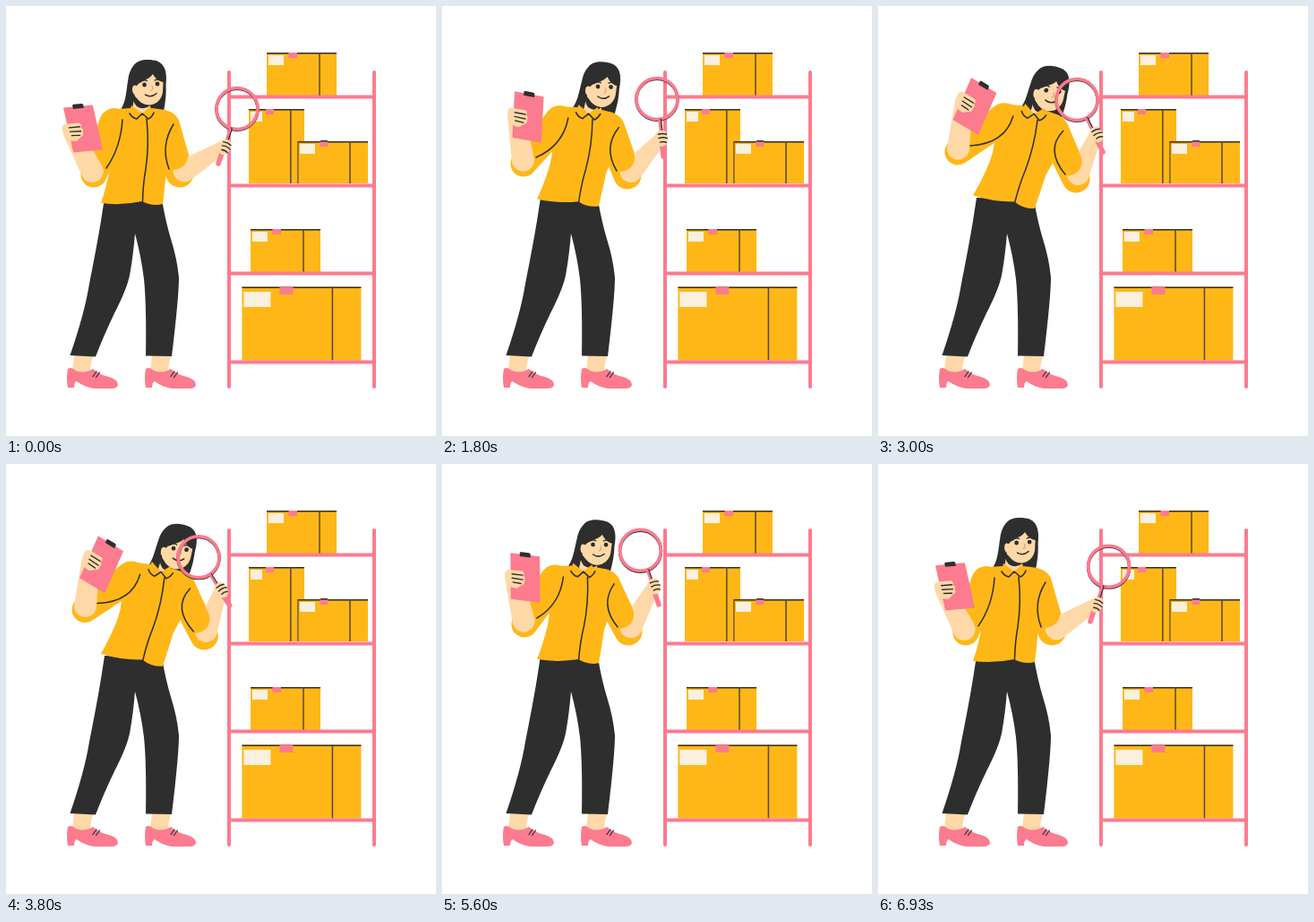
These frames come from a looping animation (480x480 px, 6990 ms). An HTML page with a canvas:

```html
<!DOCTYPE html>
<html lang="en">
<head>
<meta charset="utf-8">
<title>Stock check</title>
<style>
html, body { margin: 0; width: 100%; height: 100%; overflow: hidden; background: #fff; }
canvas { display: block; width: 100vw; height: 100vh; }
</style>
</head>
<body>
<canvas id="stage" width="480" height="480"></canvas>
<script>
const ctx = document.getElementById('stage').getContext('2d');
const YELLOW = '#ffb718', PINK = '#fc7b8f', DARK = '#2e2e2e', SKIN = '#ffd8a8', CREAM = '#faf0df', SEAM = '#5a4820';
const LOOP = 6990, STEPS = 70;

// Key poses over one loop; the values between them are smoothed.
const KEYS = [0, 8, 18, 30, 46, 56, STEPS];
const TRACKS = {
  lean:    [0, 2, 12, 23, 17, 6],
  tilt:    [0, .02, .1, .2, .15, .05],
  headX:   [0, 5, 17, 29, 24, 12],
  headY:   [0, 1, 2, 6, 5, 2],
  headR:   [0, .03, .1, .17, .15, .08],
  boardX:  [86, 89, 96, 108, 102, 93],
  boardY:  [137, 133, 124, 112, 116, 127],
  boardR:  [-.09, -.03, .18, .54, .45, .12],
  elbowLX: [98, 95, 91, 89, 88, 92],
  elbowLY: [188, 186, 176, 163, 166, 179],
  elbowRX: [194, 195, 207, 221, 218, 208],
  elbowRY: [187, 187, 189, 193, 190, 187],
  handX:   [243, 243, 244, 243, 236, 236],
  handY:   [157, 153, 148, 144, 139, 137],
  lensX:   [258, 254, 240, 222, 212, 221.5],
  lensY:   [114.5, 110.7, 103.5, 104.5, 102, 96.3],
  endX:    [237, 239, 247, 251, 247, 242],
  endY:    [176, 174, 168, 163, 154, 157]
};

function slope(v, i) {
  if (i % 6 === 0) return 0;
  return (v[(i + 1) % 6] - v[i - 1]) / (KEYS[i + 1] - KEYS[i - 1]);
}

function sample(v, n) {
  let i = 0;
  while (n >= KEYS[i + 1]) i++;
  const span = KEYS[i + 1] - KEYS[i], u = (n - KEYS[i]) / span;
  const a = v[i], b = v[(i + 1) % 6], u2 = u * u, u3 = u2 * u;
  return a * (2 * u3 - 3 * u2 + 1) + b * (3 * u2 - 2 * u3)
    + span * (slope(v, i) * (u3 - 2 * u2 + u) + slope(v, i + 1) * (u3 - u2));
}

function fill(path, color) {
  ctx.fillStyle = color;
  ctx.fill(new Path2D(path));
}

function stroke(path, color = DARK, width = 1.5) {
  ctx.strokeStyle = color;
  ctx.lineWidth = width;
  ctx.stroke(new Path2D(path));
}

function rect(x, y, w, h, color) {
  ctx.fillStyle = color;
  ctx.fillRect(x, y, w, h);
}

function circle(x, y, r, color) {
  ctx.fillStyle = color;
  ctx.beginPath();
  ctx.arc(x, y, r, 0, 7);
  ctx.fill();
}

function placed(x, y, angle, draw) {
  ctx.save();
  ctx.translate(x, y);
  ctx.rotate(angle);
  draw();
  ctx.restore();
}

// Tapered limb between two round joints.
function limb([ax, ay], ra, [bx, by], rb, color) {
  const dir = Math.atan2(by - ay, bx - ax);
  const off = Math.acos((ra - rb) / Math.hypot(bx - ax, by - ay));
  ctx.fillStyle = color;
  ctx.beginPath();
  ctx.arc(ax, ay, ra, dir + off, dir - off + 2 * Math.PI);
  ctx.arc(bx, by, rb, dir - off, dir + off);
  ctx.fill();
}

function toward([ax, ay], [bx, by], dist) {
  const k = dist / Math.hypot(bx - ax, by - ay);
  return [ax + (bx - ax) * k, ay + (by - ay) * k];
}

function carton(x, y, w, h, seam, labelW, labelH, tapeX, tapeW, drop = 3) {
  rect(x, y, w, h, YELLOW);
  rect(x, y, w, 1.5, DARK);
  rect(x + seam - .75, y, 1.5, h, SEAM);
  rect(x + 2, y + drop, labelW, labelH, CREAM);
  rect(x + tapeX, y, tapeW, drop + 3, PINK);
}

function shelf() {
  carton(291, 52, 78, 48, 59, 17, 11, 24.5, 9.5);
  carton(271, 115, 62, 83, 46.8, 13, 11, 19, 9);
  carton(326, 151, 78, 47, 58, 17, 11, 24.5, 8.5);
  rect(325.3, 151, 1.2, 47, SEAM);
  rect(351, 150, 8, 1.5, DARK);
  carton(273, 249, 78, 48, 59, 17, 11, 24.5, 9.5);
  carton(263.4, 313.5, 133, 82, 101, 30, 17, 42, 15, 5.5);
  for (const y of [101.5, 200.5, 298.5, 397.5]) stroke(`M249 ${y}H411`, PINK, 4.2);
  stroke('M249 74V425M411 74V425', PINK, 4);
}

function shoe() {
  fill('M76 389L98 389Q94 398 94 411L74 408Z', SKIN);
  fill('M69 405Q73 402 78 407Q88 411 97 405Q105 412 115 414Q125 417 125 423Q124 427 118 427L98 427Q87 425 79 419Q76 420 76 426L69 426Q67 415 69 405Z', PINK);
  stroke('M97 413.5L101 408M100.5 414.5L104.5 409', DARK, 1.2);
}

function legs() {
  shoe();
  placed(87, 0, 0, shoe);
  fill('M110 214L174 216Q178 240 184 260Q191 282 193 303Q193 325 185 391L156 390.5Q157 335 154 305Q151 280 144 254Q142 278 138.5 298Q136 314 121 343Q109 368 100 391.5L71.5 390Q88 342 93 310Q101 270 106 240Z', DARK);
}

function head() {
  fill('M142 67C147 59 160 59 169 61.5C178 65 180 76 178.5 88C179 100 178 106 176 118L127 117C134 108 134 96 136 84Q137 73 142 67Z', DARK);
  fill('M144 96L161 108L161 122L150 124L141 116Z', SKIN);
  fill('M141 97Q148 108 162 110.5Q154 117 146 112Q141 107 141 97Z', DARK);
  fill('M164 76C159 83 150 83 146 89Q141 87 141 93Q141 98 144 99C147 106 153 110.5 160 110.5C169 110 174 103 175 96L175.5 85C170 84 166 80 164 76Z', SKIN);
  circle(154.5, 88, 2.4, DARK);
  circle(169, 87, 2.4, DARK);
  stroke('M150 85Q153 81.5 157.5 83.5M166 83Q169 81 172.5 83', DARK, 1.3);
  stroke('M163 89Q165 93.5 162 94.5', '#d99b70', 1);
  stroke('M155.5 99Q162 103 168 97.5', DARK, 1.5);
}

function render(n) {
  const p = {};
  for (const key in TRACKS) p[key] = sample(TRACKS[key], n);

  // The waist stays put while the shoulders lean and the body tilts.
  const bend = (x, y) => [x + p.lean * (220 - y) / 103, y + p.tilt * (x - 150)];
  const bent = path => path.replace(/([\d.]+) ([\d.]+)/g, (_, x, y) => bend(+x, +y).join(' '));

  const elbowL = [p.elbowLX, p.elbowLY], elbowR = [p.elbowRX, p.elbowRY];
  const shoulderL = bend(121, 131), shoulderR = bend(177, 134);
  const hand = [p.handX, p.handY];
  const c = Math.cos(p.boardR), s = Math.sin(p.boardR);
  const grip = [p.boardX - 12 * c - 4 * s, p.boardY - 12 * s + 4 * c];

  rect(0, 0, 480, 480, '#fff');
  shelf();
  legs();
  placed(156 + p.headX, 113 + p.headY, p.headR, () => {
    ctx.translate(-156, -113);
    head();
  });

  // Sleeves roll over the forearms above the elbow.
  limb(shoulderL, 17, elbowL, 14.5, YELLOW);
  limb(shoulderR, 17, elbowR, 15.5, YELLOW);
  limb(toward(elbowL, grip, 4), 12.5, grip, 10, SKIN);
  limb(toward(elbowR, hand, 6), 12.5, hand, 7, SKIN);
  limb(shoulderR, 17, toward(elbowR, shoulderR, 21), 15.5, YELLOW);

  // Shirt
  fill(bent('M139 114L124 115Q111 117 111 135Q119 160 116 180Q112 203 106 220Q128 223 152 218Q163 224 175 221Q177 205 179 183Q190 150 190 126Q186 118 178 116L163 114L152 122Z'), YELLOW);
  fill(bent('M140 111L152 120L146 127L137 121Z'), YELLOW);
  fill(bent('M152 120L161 112L165 120L159 127Z'), YELLOW);
  stroke(bent('M138 120Q141 125 146 126L152 120L159 126Q163 124 165 119'), DARK, 1.6);
  stroke(bent('M157 126Q160 155 156 182Q153 198 152.5 218'), DARK, 1.5);
  stroke(`M${bend(130, 127)}Q${bend(128, 158)} ${elbowL[0] + 14} ${elbowL[1] - 7}`);
  stroke(`M${bend(187, 132)}Q${bend(172, 156)} ${elbowR[0] - 12} ${elbowR[1] - 5}`);

  // Clipboard, seen slightly askew
  placed(p.boardX, p.boardY, p.boardR, () => {
    ctx.transform(1, 0, .13, 1, 0, 0);
    rect(-16.5, -25.5, 33, 51, PINK);
    fill('M-6 -23V-27Q-6 -28 -4 -28H4Q6 -28 6 -27V-23Z', DARK);
    fill('M-23 -3Q-21 -8 -15 -7L-3 -7Q0 -5 -2 -2Q1 0 -1 3Q0 7 -3 8L-10 13Q-21 13 -23 5Z', SKIN);
    stroke('M-15 -2.5L-3 -2.5M-15 2L-3 2.5M-14 6.5L-5 7', DARK, 1.4);
  });

  // Magnifier
  const lens = [p.lensX, p.lensY], end = [p.endX, p.endY];
  const ring = 'a23 23 0 1 0 46 0a23 23 0 1 0 -46 0';
  const neck = toward(lens, end, 24), mid = toward(lens, end, 42);
  stroke(`M${lens[0] - 23} ${lens[1] + .9}${ring}`, DARK, 3.4);
  stroke(`M${lens[0] - 23} ${lens[1]}${ring}`, PINK, 3.6);
  stroke(`M${neck[0] + 1} ${neck[1]}L${mid[0] + 1} ${mid[1]}`, DARK, 3.2);
  stroke(`M${neck}L${mid}`, PINK, 2.6);
  stroke(`M${mid}L${end}`, PINK, 5.5);
  const turn = Math.atan2(end[1] - lens[1], end[0] - lens[0]) - Math.PI / 2;
  placed(hand[0], hand[1], turn, () => {
    fill('M-6 -4Q-4 -9 3 -9Q8 -8 7 -3Q9 0 7 4Q6 9 0 9Q-7 7 -6 -4Z', SKIN);
    stroke('M-2 -5Q3 -6 7 -4M-2 -.5Q3 -2 7.5 .5M-1 4Q3 3 6 5', DARK, 1.4);
  });
}

// Steps alternate between 130 ms and 70 ms.
function stepAt(t) {
  return 2 * Math.floor(t / 200) + (t % 200 >= 130 ? 1 : 0);
}

const start = performance.now();
ctx.lineCap = ctx.lineJoin = 'round';

function tick(now) {
  render(stepAt(Math.max(0, now - start) % LOOP));
  requestAnimationFrame(tick);
}
tick(start);
</script>
</body>
</html>
```
